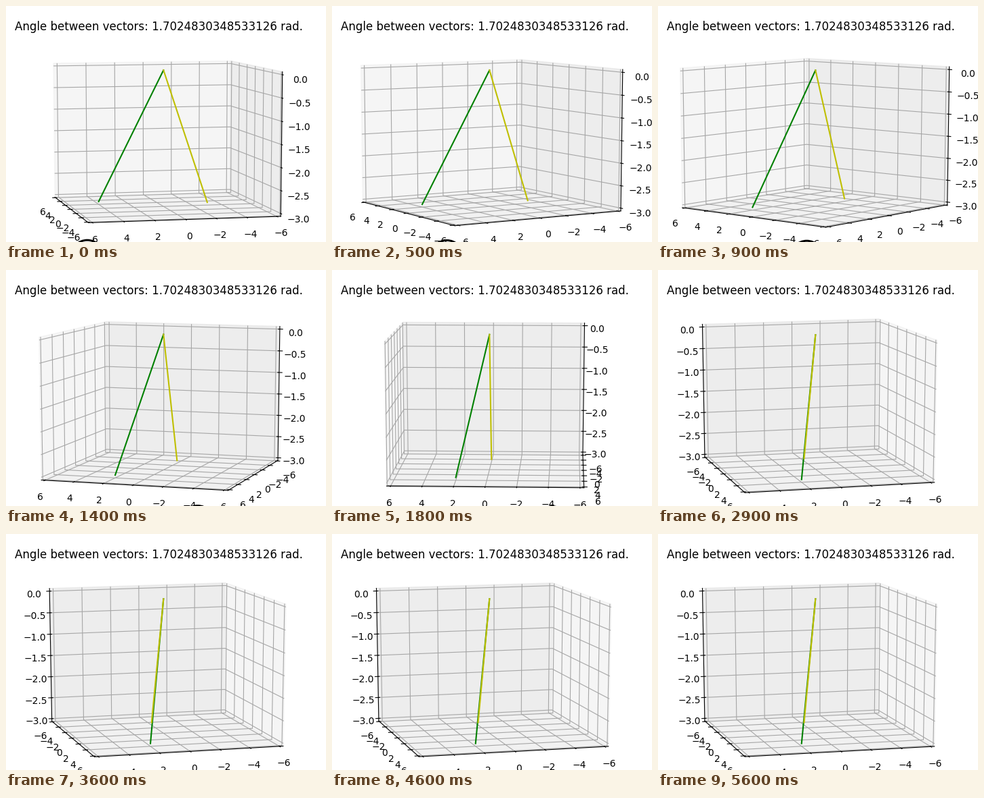
These frames come from a looping animation (472x350 px, 6000 ms). A matplotlib script:

```python
import numpy as np
import matplotlib.pyplot as plt
from matplotlib.animation import FuncAnimation
from matplotlib.patches import Circle

WIDTH, HEIGHT, DPI = 472, 350, 100
FRAMES, INTERVAL = 60, 100
U, V = (2, 4, -3), (0, -3, -3)

AX_W, AX_H = 496, 369.6
AX_LEFT, AX_TOP = -22.4, 15
RING_RADIUS = 23.5
DEGREES_PER_PIXEL = 180 / AX_W

# Key points of the mouse drag
DRAG_FRAMES = np.array([0, 5, 14, 22, 29])
DRAG_AZIM = np.array([167, 149, 107.9, 81, 75])
START, END = DRAG_AZIM[0], DRAG_AZIM[-1]


def smooth(t, times, values):
    """Cubic Hermite curve through the key points, constant outside."""
    t = np.clip(t, times[0], times[-1])
    slopes = np.gradient(values, times)
    i = min(np.searchsorted(times, t, side="right") - 1, len(times) - 2)
    h = times[i + 1] - times[i]
    s = (t - times[i]) / h
    return ((1 + 2 * s) * (1 - s) ** 2 * values[i]
            + s * (1 - s) ** 2 * h * slopes[i]
            + s ** 2 * (3 - 2 * s) * values[i + 1]
            + s ** 2 * (s - 1) * h * slopes[i + 1])


def nudge(frame):
    """Single-pixel mouse moves after the drag: three forth, three back."""
    forth = sum(frame >= k for k in (30, 31, 32))
    back = sum(frame >= k for k in (36, 40, 41))
    return forth - back


fig = plt.figure(figsize=(WIDTH / DPI, HEIGHT / DPI), dpi=DPI, facecolor="white")
plt.rcParams["grid.color"] = "#a6a6a6"
ax = fig.add_axes([AX_LEFT / WIDTH, (HEIGHT - AX_TOP - AX_H) / HEIGHT,
                   AX_W / WIDTH, AX_H / HEIGHT], projection="3d")
ax.patch.set_visible(False)
# A unit cube stretched to the full, non-square axes rectangle
ax.apply_aspect = lambda position=None: None
ax.set_box_aspect((1, 1, 1), zoom=np.sqrt(3) / 1.8294640721620434)

for axis, gray in ((ax.xaxis, 0.95), (ax.yaxis, 0.9), (ax.zaxis, 0.925)):
    axis.set_pane_color((gray, gray, gray, 0.7))

for vector, color in ((U, "g"), (V, "y")):
    ax.plot(*[(0, end) for end in vector], color=color, lw=1.5)

ax.set_xticks(np.arange(-6, 7, 2))
ax.set_yticks(np.arange(-6, 7, 2))
ax.set_zticks(np.arange(-3, 0.1, 0.5))
ax.set(xlim=(-6.25, 6.25), ylim=(-6.25, 6.25), zlim=(-3.0625, 0.0625))

fig.text(225 / WIDTH, 1 - 36 / HEIGHT,
         "Angle between vectors: 1.7024830348533126 rad.",
         fontsize=12, ha="center", va="baseline")

overlay = fig.add_axes([0, 0, 1, 1], zorder=5)
overlay.set(xlim=(0, WIDTH), ylim=(HEIGHT, 0))
overlay.axis("off")
ring = overlay.add_patch(Circle((0, 0), RING_RADIUS, fill=False, ec="black",
                                lw=3 * 72 / DPI))


def update(frame):
    azim = smooth(frame, DRAG_FRAMES, DRAG_AZIM)
    descent = ((START - azim) / (START - END)) ** 1.7
    ax.view_init(elev=7.6 + 4.5 * descent,
                 azim=azim - nudge(frame) * DEGREES_PER_PIXEL)
    ring.center = (119.8 + (START - azim) / DEGREES_PER_PIXEL,
                   347.2 + 5 * descent + RING_RADIUS)
    return ax, ring


anim = FuncAnimation(fig, update, frames=FRAMES, interval=INTERVAL,
                     init_func=lambda: update(0), repeat=True, repeat_delay=0)
plt.show()
```
